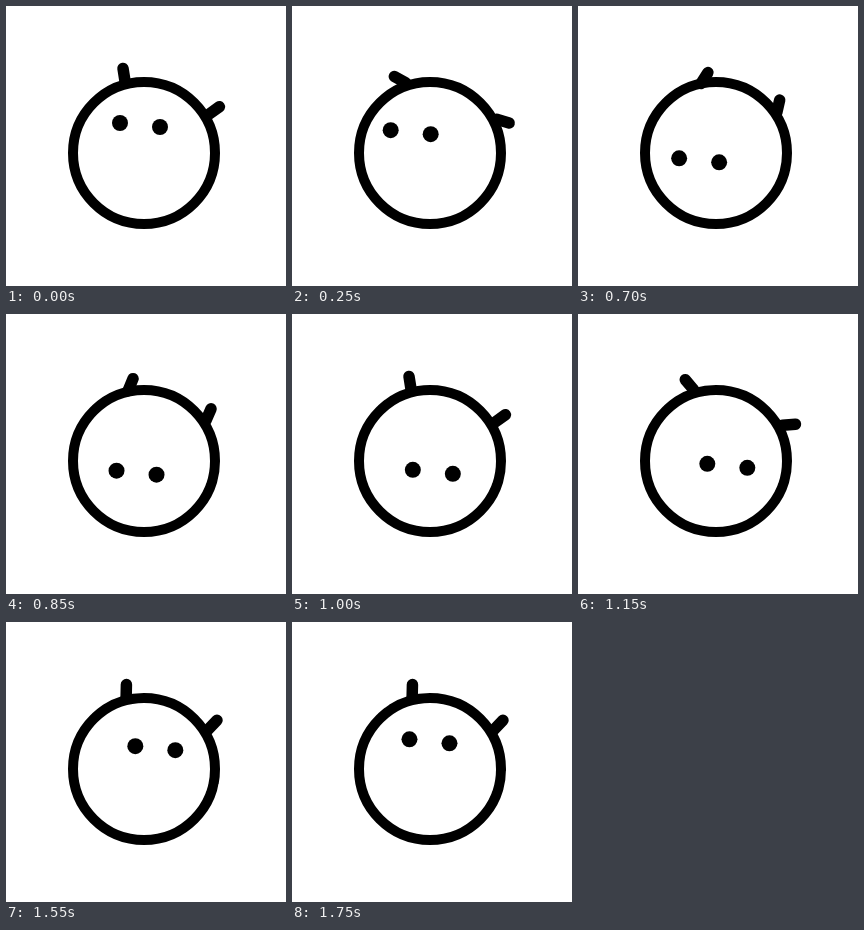
An HTML page that plays this animation: 280x280 px, repeating every 1800 ms.

```html
<!DOCTYPE html>
<html lang="en">
<head>
<meta charset="utf-8">
<title>Wiggling ears</title>
<style>
  html, body { margin: 0; width: 100%; height: 100%; overflow: hidden; background: #fff; }
  svg { display: block; width: 100vw; height: 100vh; }
  .line { fill: none; stroke: #000; stroke-linecap: round; }
</style>
</head>
<body>
<svg viewBox="0 0 280 280">
  <circle class="line" cx="138" cy="147" r="71" stroke-width="10"/>
  <path class="line" id="leftEar" d="M2-19V-6" stroke-width="11.5"/>
  <path class="line" id="rightEar" d="M-1.2-19V-6" stroke-width="11.5"/>
  <g id="eyes">
    <circle cx="114" cy="137" r="8"/>
    <circle cx="154" cy="141" r="8"/>
  </g>
</svg>
<script>
  const LOOP = 1800, STEP = 50;
  // Ear swing: [time in ms, degrees from rest], linear in between
  const SWING = [[0, 0], [250, -52], [750, 52], [1250, -52], [1650, 31], [LOOP, 0]];
  const [leftEar, rightEar, eyes] =
    ['leftEar', 'rightEar', 'eyes'].map(id => document.getElementById(id));

  function swingAt(t) {
    const i = SWING.findIndex(([time]) => time > t);
    const [t0, a0] = SWING[i - 1], [t1, a1] = SWING[i];
    return a0 + (a1 - a0) * (t - t0) / (t1 - t0);
  }

  function place(el, x, y, angle = 0) {
    el.setAttribute('transform', `translate(${x} ${y}) rotate(${angle})`);
  }

  function draw() {
    const t = Math.floor(performance.now() % LOOP / STEP) * STEP;
    const turn = t / LOOP * 2 * Math.PI;
    const tilt = swingAt(t) - 9;
    place(eyes, -20 * Math.sin(turn), -20 * Math.cos(turn));
    place(leftEar, 118, 81.5, tilt);
    place(rightEar, 198.6, 112.8, 45.5 - tilt);
    requestAnimationFrame(draw);
  }
  draw();
</script>
</body>
</html>
```
